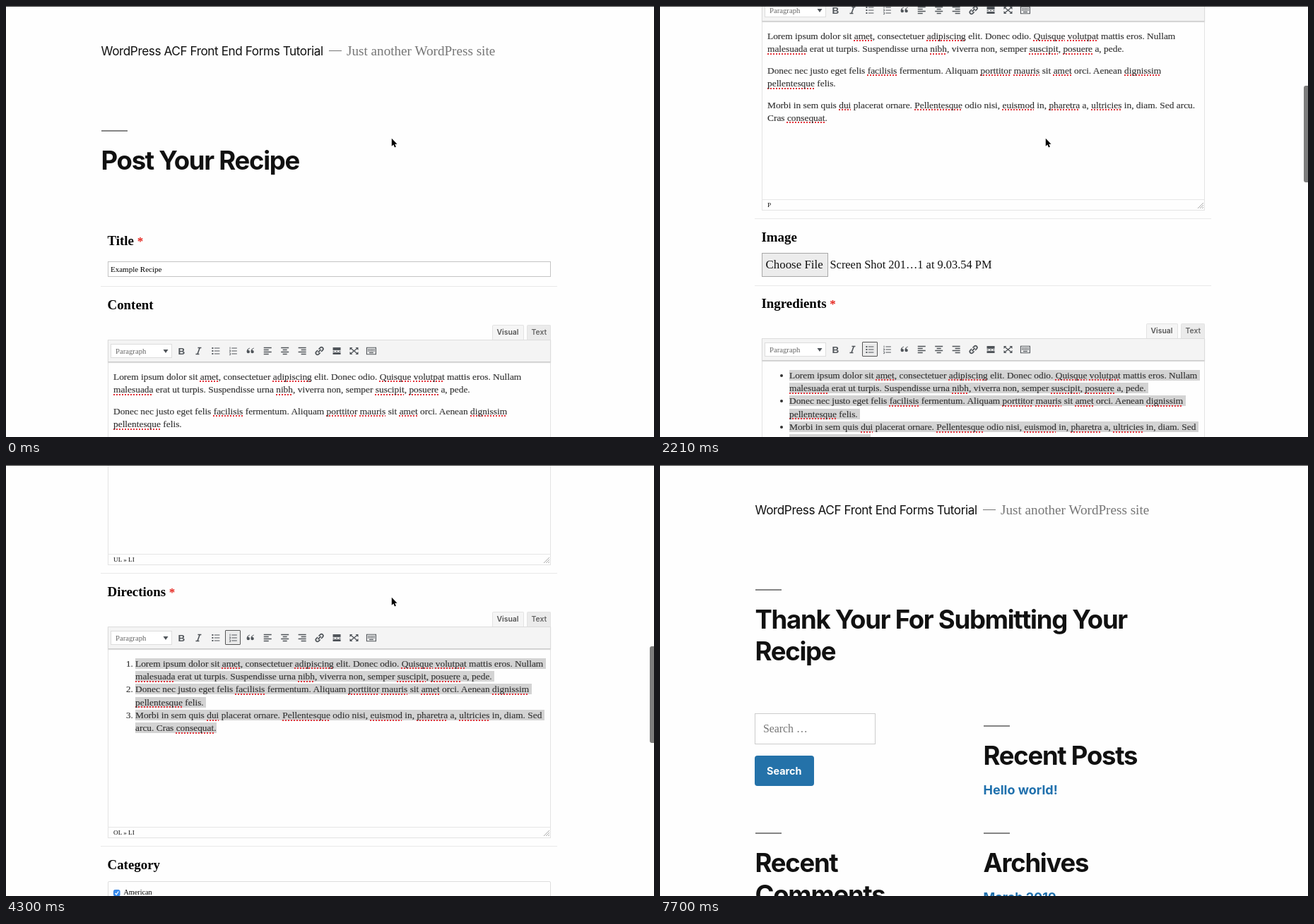
These frames come from a looping animation (917x611 px, 9350 ms). An HTML page:

```html
<!DOCTYPE html>
<html lang="en">
<head>
<meta charset="utf-8">
<title>Recipe form</title>
<style>
  html, body { margin: 0; width: 100%; height: 100%; overflow: hidden; background: #fefefe; }
  #stage { position: relative; width: 917px; height: 611px; overflow: hidden; color: #111;
    font-family: "Liberation Serif", "Times New Roman", serif; }
  #stage div, #stage svg { position: absolute; box-sizing: border-box; }
  .text { line-height: 0; white-space: pre; }
  .sans { font-family: Inter, sans-serif; }
  .heading { font: 700 36.5px/0 Inter, sans-serif; letter-spacing: -1.27px; }
  .label { font-weight: 700; color: #000; }
  .label i { font-style: normal; font-size: 17px; color: #e5261f; }
  .body { color: #333; -webkit-text-stroke: .15px #333; }
  u { text-decoration: underline dotted #e2333a 1.5px; text-underline-offset: 2px; text-decoration-skip-ink: none; }
  mark { background: #d3d3d3; color: inherit; }
  .button { background: #2472a9; border-radius: 4px; }
  .button.hover { background: #111; }
  .button.focus { outline: 1px dotted #fff; outline-offset: -4px; }
  #bar { left: 911px; width: 8px; height: 137px; border-radius: 3px; background: #7d7d7d; }
  #edge { left: 0; top: 0; width: 917px; height: 1px; background: #3a3a3a; }
</style>
</head>
<body>
<div id="stage">
  <div id="form"></div>
  <div id="done"></div>
  <div id="bar"></div>
  <svg id="cursor" width="12.6" height="18" viewBox="-2 -2 14 20">
    <path d="M0 0V12.2L2.8 9.6L4.7 14L6.8 13.1L4.9 8.8H8.6Z" stroke="#fff" stroke-width="1.6" paint-order="stroke"/>
  </svg>
  <div id="edge"></div>
</div>
<script>
const $ = id => document.getElementById(id);

// y is the vertical centre of the line
const text = (x, y, size, str, cls = '', css = '') =>
  `<div class="text ${cls}" style="left:${x}px;top:${y}px;font-size:${size}px;${css}">${str}</div>`;
const box = (x, y, w, h, css, attrs = '') =>
  `<div ${attrs} style="left:${x}px;top:${y}px;width:${w}px;height:${h}px;${css}"></div>`;
const rule = y => box(134, y, 646, 1, 'background:#e9e9e9');
const dash = (x, y) => box(x, y, 37, 2, 'background:#858585');
const title = (x, y, str) => text(x, y, 36.5, str, 'heading');
const heading = (x, y, str) => dash(x, y - 43) + title(x, y, str);
const label = (y, str, required) =>
  text(143.5, y, 18.9, str + (required ? ' <i>*</i>' : ''), 'label');

// _word_ marks a spelling underline
const spell = str => str.replace(/_(\w+)_/g, '<u>$1</u>');
const lorem = [
  'Lorem ipsum dolor sit _amet_, consectetuer _adipiscing_ elit. Donec odio. _Quisque_ _volutpat_ mattis eros. Nullam',
  '_malesuada_ erat ut turpis. Suspendisse urna _nibh_, viverra non, semper _suscipit_, _posuere_ a, pede.',
  'Donec nec justo eget felis _facilisis_ fermentum. Aliquam _porttitor_ _mauris_ sit _amet_ orci. Aenean _dignissim_',
  '_pellentesque_ felis.',
  'Morbi in sem quis _dui_ placerat ornare. _Pellentesque_ odio nisi, _euismod_ in, _pharetra_ a, _ultricies_ in, diam. Sed',
  'arcu. Cras _consequat_.'
];

const paragraphs = y => [...lorem.slice(0, 4), lorem[4] + ' arcu.', 'Cras _consequat_.']
  .map((line, i) => text(152, y + i * 18.35 + (i >> 1) * 12.2, 13.4, spell(line), 'body')).join('');

const list = (y, ordered) => lorem.map((line, i) => {
  const lineY = y + i * 18.3, first = i % 2 === 0;
  const bullet = !first ? '' : ordered
    ? text(170, lineY, 13, `${i / 2 + 1}.`, 'body')
    : box(170, lineY - 2, 4, 4, 'background:#333;border-radius:2px');
  return bullet + text(183, lineY, 13.4, `<mark>${spell(line)}${i < 5 ? ' ' : ''}</mark>`, 'body');
}).join('');

const stroke = (d, width = 1.5) => `<path d="${d}" fill="none" stroke="#50555a" stroke-width="${width}"/>`;
const rows = (...spans) => stroke(spans.map(([x, w], i) => `M${x} ${i * 3 - 4.5}h${w}`).join(''), 1.5);
const quote = 'c-3 1-4.4 3-4.4 5.6a2.2 2.2 0 1 0 2-2.2c.2-1.4 1-2 2.4-2.4z';
const icons = [
  '<text x="-4.6" y="4.8" font-family="Liberation Sans, sans-serif" font-weight="700" font-size="13.5">B</text>',
  stroke('M-1-4.5h5M-4 4.5h5M1.8-4.5L-1.5 4.5', 1.6),
  stroke('M-2-4h7.5M-2 0h7.5M-2 4h7.5', 1) + stroke('M-5.5-4h2M-5.5 0h2M-5.5 4h2', 1.8),
  stroke('M-2-4h7.5M-2 0h7.5M-2 4h7.5', 1) + stroke('M-4.3-5.5v3M-5.4-1h1.6v2h-1.6M-5.4 3h1.6v2.6h-1.6', .8),
  `<path d="M-.8-4.5${quote}M5-4.5${quote}"/>`,
  rows([-5.5, 11], [-5.5, 7], [-5.5, 11], [-5.5, 7]),
  rows([-5.5, 11], [-3, 6], [-5.5, 11], [-3, 6]),
  rows([-5.5, 11], [-1.5, 7], [-5.5, 11], [-1.5, 7]),
  '<g transform="rotate(-45)" fill="none" stroke="#50555a" stroke-width="1.7">' +
    '<path d="M-1-2.4h-3a2.4 2.4 0 0 0 0 4.8h3M1-2.4h3a2.4 2.4 0 0 1 0 4.8h-3M-3 0h6"/></g>',
  '<path d="M-5.5-5h11v4h-11zM-5.5 2h11v3h-11z"/>' + stroke('M-5.5.5h2.5M-1.3.5h2.6M3 .5h2.5', 1),
  stroke('M-5-4L5 4M5-4L-5 4', 1.3) +
    '<path d="M-6-5h4l-4 4zM6-5h-4l4 4zM-6 5h4l-4-4zM6 5h-4l4-4z"/>',
  stroke('M-6.5-4.7h13v9.4h-13z', 1.1) + stroke('M-5-2.3h10M-5 0h10', 1.4).replace('/>', ' stroke-dasharray="1.4 .8"/>') +
    stroke('M-3 2.5h6', 1.3)
];

function editor(dy, name, required, active, status, content) {
  const y = n => n + dy;
  const iconX = i => 248 + i * 24.45;
  const tab = (x, w, str, bg, color) =>
    box(x, y(452), w, 22, `background:${bg};border:1px solid #e3e3e3;border-bottom:0;border-radius:2px 2px 0 0`) +
    text(x + 6.5, y(462.5), 10.4, str, 'sans', `font-weight:600;color:${color}`);
  return label(y(424), name, required) +
    tab(688, 45, 'Visual', '#f5f5f5', '#555') + tab(737, 34, 'Text', '#ebebeb', '#666') +
    box(144, y(473), 627, 300, 'border:1px solid #e3e3e3') +
    box(144, y(473), 627, 32, 'background:#f4f4f4;border:1px solid #dcdcdc;border-bottom-color:#ccc;box-shadow:0 1px 1px #ddd') +
    box(148, y(479), 87, 20, 'background:#fff;border:1px solid #ddd') +
    text(155, y(488.5), 10.7, 'Paragraph', '', 'color:#666') +
    (active ? box(iconX(active) - 11, y(478), 22, 21, 'background:#ebebeb;border:1px solid #555;border-radius:1px') : '') +
    `<svg style="left:0;top:${y(473)}px" width="780" height="32" fill="#50555a">
      <path d="M222.5 14h7l-3.5 5z"/>
      ${icons.map((icon, i) => `<g transform="translate(${iconX(i)} 16)">${icon}</g>`).join('')}
      </svg>` +
    content(y(525.8)) +
    box(144, y(757), 626, 1, 'background:#e6e6e6') +
    text(152, y(764.5), 9.2, status) +
    `<svg style="left:760px;top:${y(761)}px" width="10" height="10"><path d="M1 9L9 1M4 9L9 4M7 9L9 7" stroke="#aaa"/></svg>` +
    rule(y(784));
}

const header =
  text(134.5, 63.5, 17.2, 'WordPress ACF Front End Forms Tutorial', 'sans', 'letter-spacing:-.43px') +
  box(457, 63, 18, 1, 'background:#767676') +
  text(482, 63.5, 19.15, 'Just another WordPress site', '', 'color:#767676');

const button = (y, w, str, id) =>
  box(134, y, w, 43, '', `class="button" ${id ? `id="${id}"` : ''}`) +
  text(151, y + 22, 14.4, str, 'sans', 'font-weight:700;color:#fff');

const link = (y, str) => text(457.5, y, 18, str, 'sans', 'font-weight:700;color:#1f70ad');

const footer = y =>
  box(134, y, 171, 44, 'background:#fff;border:1px solid #ccc') +
  text(146, y + 21.5, 15.8, 'Search …', '', 'color:#767676') +
  button(y + 60, 84, 'Search') +
  heading(457.5, y + 59.5, 'Recent Posts') + link(y + 109, 'Hello world!') +
  heading(134.5, y + 212, 'Recent') + title(134.5, y + 257, 'Comments') +
  heading(457.5, y + 212, 'Archives') + link(y + 261, 'March 2019');

const categories = ['American', 'Asian', 'Italian', 'Mexican', 'Seafood'].map((name, i) => {
  const y = 1718.5 + i * 16.8, checked = i < 2;
  return `<svg style="left:152px;top:${y - 4.5}px" width="10" height="10">
      <rect x=".5" y=".5" width="8.5" height="8.5" rx="1.8" fill="${checked ? '#388cf0' : '#fff'}" stroke="${checked ? '#2f7fe0' : '#aaa'}"/>
      ${checked ? '<path d="M2.4 5L4.2 6.9L7.2 2.5" fill="none" stroke="#fff" stroke-width="1.3"/>' : ''}</svg>` +
    text(166.5, y - .3, 10.2, name, '', 'color:#000');
}).join('');

$('form').innerHTML = header + heading(134.5, 219, 'Post Your Recipe') +
  label(333, 'Title', true) +
  box(144, 362, 627, 22, 'background:#fff;border:1px solid #c4c4c4') +
  text(148, 372.5, 11, 'Example Recipe', '', 'color:#000') + rule(397) +
  editor(0, 'Content', false, 0, 'P', paragraphs) +
  label(811, 'Image') +
  box(144, 833, 94, 34, 'background:#ececec;border:1px solid #a8a8a8') +
  text(149.5, 850, 16.9, 'Choose File') + text(240.5, 850, 16.4, 'Screen Shot 201…1 at 9.03.54 PM') + rule(879) +
  editor(481, 'Ingredients', true, 2, 'UL » LI', y => list(y, false)) +
  editor(868, 'Directions', true, 3, 'OL » LI', y => list(y, true)) +
  label(1679, 'Category') +
  box(144, 1702, 627, 100, 'border:1px solid #dedede;border-radius:2px') + categories +
  button(1814, 182, 'Submit a new Recipe', 'submit') + footer(1924);

$('done').innerHTML = header + heading(134.5, 219, 'Thank Your For Submitting Your') +
  title(134.5, 264, 'Recipe') + footer(352);

const LOOP = 9350, STEP = 148;
const scrollKeys = [[4, 0], [8, 161], [15, 483], [19, 610], [20, 610], [25, 893], [29, 1112], [35, 1364]];
const cursorKeys = [[35, 546, 188], [36, 400, 290], [37, 192, 438], [38, 200, 458], [40, 208, 464], [42, 208, 464], [49, 463, 536]];

function at(keys, step) {
  const next = keys.findIndex(key => key[0] > step);
  if (next === 0) return keys[0].slice(1);
  if (next < 0) return keys[keys.length - 1].slice(1);
  const a = keys[next - 1], b = keys[next], f = (step - a[0]) / (b[0] - a[0]);
  return a.slice(1).map((v, i) => v + (b[i + 1] - v) * f);
}

function draw() {
  const step = Math.floor((performance.now() % LOOP + 10) / STEP);
  const scroll = Math.round(at(scrollKeys, step)[0]);
  const [x, y] = at(cursorKeys, step);
  const sent = step >= 51;
  $('form').style.display = sent ? 'none' : '';
  $('done').style.display = sent ? '' : 'none';
  $('form').style.top = -scroll + 'px';
  $('bar').style.top = 2 + scroll * .2295 + 'px';
  $('bar').style.opacity = step < 5 || step > 38 ? 0 : step === 38 ? .5 : 1;
  $('cursor').style.display = sent ? 'none' : '';
  $('cursor').style.left = x - 2 + 'px';
  $('cursor').style.top = y - 2 + 'px';
  $('submit').classList.toggle('hover', step >= 38);
  $('submit').classList.toggle('focus', step >= 42);
  requestAnimationFrame(draw);
}
draw();
</script>
</body>
</html>
```
